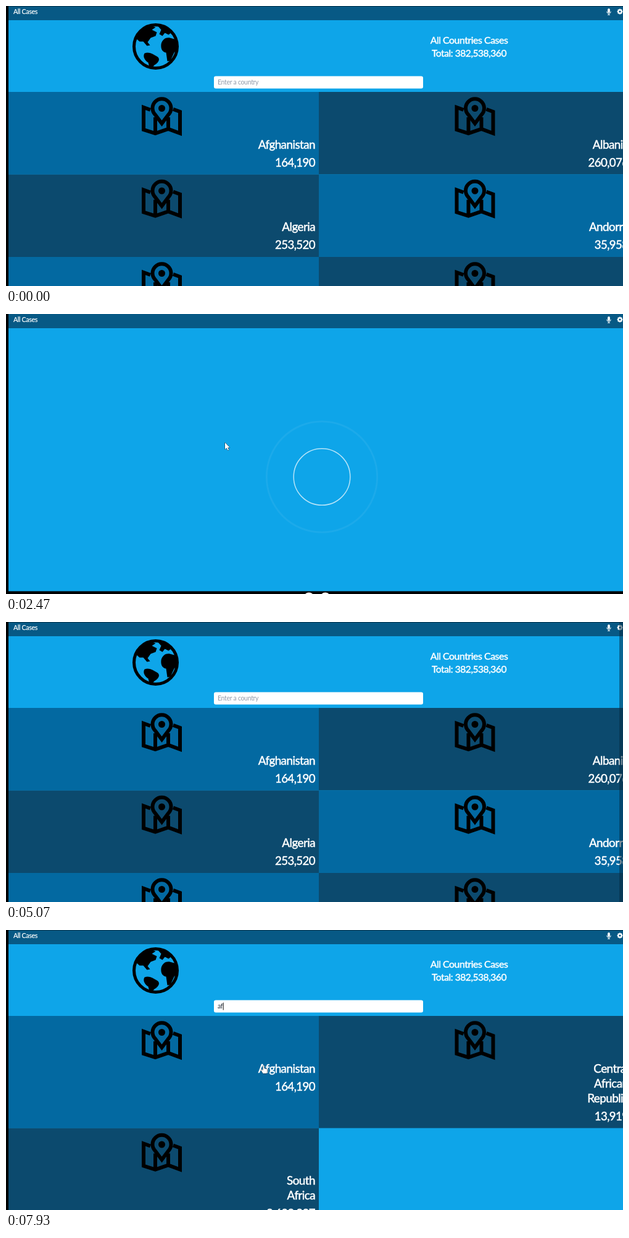
Write an HTML page with a canvas that moves like this. It is 1000 px wide and 453 px high and loops after 8000 ms.

```html
<!DOCTYPE html>
<html lang="en">
<head>
<meta charset="utf-8">
<title>All Cases</title>
<style>
html, body { margin: 0; width: 100%; height: 100%; overflow: hidden; background: #000; }
canvas { display: block; width: 100vw; height: 100vh; }
</style>
</head>
<body>
<canvas id="stage" width="1000" height="453"></canvas>
<script>
const ctx = document.getElementById('stage').getContext('2d');
const LOOP = 8000, STEP = 130;
const SKY = '#0ea5e9', MID = '#0369a1', DEEP = '#0c4a6e', HEAD = '#075985';

const COUNTRIES = [
  [['Afghanistan'], '164,190'], [['Albania'], '260,076'],
  [['Algeria'], '253,520'], [['Andorra'], '35,958'],
  [['Angola'], '98,057'], [['Antigua'], '7,140']
];
const MATCHES = [
  [['Afghanistan'], '164,190'],
  [['Central', 'African', 'Republic'], '13,919'],
  [['South', 'Africa'], '3,609,207']
];

const MAP = new Path2D('M14 21 L3 17 V53 L22 59 L43 52 L62 59 V24 L51 20 M22 33 V59 M43 33 V52');
const PIN = new Path2D('M32.5 43 L21.5 28.5 A15 15 0 1 1 43.5 28.5 Z');
const LAND = [
  'M-33 -14 Q-26 -33 -8 -34 L0 -31 L-6 -27 L2 -23 L0 -17 L-8 -14 L-13 -7 L-9 -2 L-14 -1 L-20 -8 L-26 -8 Z',
  'M-18 11 C-10 8 -4 13 2 16 C9 20 4 27 -2 30 L-7 36 L-10 34 L-12 26 C-18 22 -21 16 -18 11 Z',
  'M9 -4 C11 -12 17 -15 23 -14 L34 -11 L35 4 L30 10 L24 23 L19 24 L17 10 C11 9 8 4 9 -4 Z',
  'M2 -35 L15 -32 L26 -23 L21 -19 L15 -22 L11 -17 L6 -20 L9 -27 Z'
].map(d => new Path2D(d));
const ARROW = new Path2D('M0 0 V11 L2.6 8.6 L4.4 12.4 L6 11.6 L4.3 8 H7.6 Z');
const HAND = new Path2D('M-1 1 Q0 -1 1 1 V5 L5 6 Q6 6 6 8 L5 13 H-1 L-4 8 L-3 7 L-1 8 Z');

function rect(x, y, w, h, color) {
  ctx.fillStyle = color;
  ctx.fillRect(x, y, w, h);
}

function disc(x, y, r, color) {
  ctx.beginPath();
  ctx.arc(x, y, r, 0, Math.PI * 2);
  ctx.fillStyle = color;
  ctx.fill();
}

function at(x, y, draw) {
  ctx.save();
  ctx.translate(x, y);
  draw();
  ctx.restore();
}

// Draws one line of text and returns its width.
function text(str, x, y, size, { align = 'left', color = '#fff', bold = 0 } = {}) {
  ctx.font = `${size}px Lato, "Open Sans", sans-serif`;
  ctx.letterSpacing = `${-0.03 * size}px`;
  ctx.textAlign = align;
  ctx.fillStyle = ctx.strokeStyle = color;
  ctx.fillText(str, x, y);
  if (bold) {
    ctx.lineWidth = bold;
    ctx.lineJoin = 'round';
    ctx.strokeText(str, x, y);
  }
  return ctx.measureText(str).width;
}

function globe(x, y) {
  at(x, y, () => {
    ctx.beginPath();
    ctx.arc(0, 0, 35, 0, Math.PI * 2);
    ctx.lineWidth = 5;
    ctx.strokeStyle = ctx.fillStyle = '#000';
    ctx.stroke();
    ctx.clip();
    LAND.forEach(shape => ctx.fill(shape));
  });
}

function mapIcon(x, y) {
  at(x, y, () => {
    ctx.strokeStyle = '#000';
    ctx.lineWidth = 6;
    ctx.lineJoin = 'miter';
    ctx.stroke(MAP);
    ctx.stroke(PIN);
    disc(32.5, 18.5, 5.5, '#000');
  });
}

function mic(x) {
  at(x, 9, () => {
    ctx.beginPath();
    ctx.roundRect(-1.9, -5, 3.8, 7, 1.9);
    ctx.fillStyle = ctx.strokeStyle = '#fff';
    ctx.fill();
    ctx.lineWidth = 1;
    ctx.beginPath();
    ctx.arc(0, -0.2, 3.3, 0, Math.PI);
    ctx.moveTo(0, 3.2);
    ctx.lineTo(0, 5.2);
    ctx.moveTo(-2, 5.2);
    ctx.lineTo(2, 5.2);
    ctx.stroke();
  });
}

function gear(x, y) {
  at(x, y, () => {
    for (let i = 0; i < 4; i++) {
      rect(-1.1, -4.4, 2.2, 8.8, '#fff');
      ctx.rotate(Math.PI / 4);
    }
    disc(0, 0, 3.5, '#fff');
    disc(0, 0, 1.6, HEAD);
  });
}

function header() {
  rect(0, 0, 1000, 23, HEAD);
}

function homeHeader() {
  header();
  text('All Cases', 12, 13, 10.6, { bold: 0.2 });
  mic(977);
  gear(995, 9);
}

function tile([lines, count], x, y, h, color) {
  rect(x, y, 507.5, h, color);
  mapIcon(x + 220.5, y + 8);
  const style = { align: 'right', bold: 0.5 };
  let base = y + 91.5;
  lines.forEach((line, i) => text(line, x + 501.5, base + i * 24, 18.9, style));
  base += (lines.length - 1) * 24 + 29;
  text(count, x + 501.5, base, 18.6, style);
}

function tiles(list, h) {
  list.forEach((item, i) => {
    const row = i >> 1, col = i & 1;
    const x = col ? 507 : -0.5;
    tile(item, x, 139 + row * h, h, (row + col) % 2 ? DEEP : MID);
  });
}

function input(typed, caret) {
  ctx.beginPath();
  ctx.roundRect(337, 113.5, 339, 20, 3);
  ctx.fillStyle = '#fff';
  ctx.fill();
  if (!typed) text('Enter a country', 343, 127, 10.5, { color: '#929baa' });
  const w = typed ? text(typed, 343, 127, 10.5, { color: '#26313f' }) : 0;
  if (caret) rect(343.5 + w, 117.5, 1, 12, '#111');
}

function home(typed, caret) {
  rect(0, 0, 1000, 453, SKY);
  homeHeader();
  rect(0, 0, 1000, 1, '#04334d');
  globe(242.5, 65.5);
  const style = { align: 'center', bold: 0.45 };
  text('All Countries Cases', 750.5, 60.5, 15.9, style);
  text('Total: 382,538,360', 750.5, 82, 15.6, style);
  input(typed, caret);
  if (typed === 'af') tiles(MATCHES, 181.5);
  else tiles(COUNTRIES, 133.5);
}

function bezier(x1, y1, x2, y2) {
  const curve = (s, a, b) => 3 * (1 - s) ** 2 * s * a + 3 * (1 - s) * s * s * b + s ** 3;
  return x => {
    let lo = 0, hi = 1;
    for (let i = 0; i < 24; i++) {
      const mid = (lo + hi) / 2;
      if (curve(mid, x1, x2) < x) lo = mid; else hi = mid;
    }
    return curve(lo, y1, y2);
  };
}
const grow = bezier(0.165, 0.84, 0.44, 1);
const fade = bezier(0.3, 0.61, 0.355, 1);

function loading(t) {
  rect(0, 0, 1000, 453, SKY);
  homeHeader();
  rect(0, 448.5, 1000, 5, '#000');
  disc(491, 459, 8.5, '#fff');
  disc(517.5, 459, 8.5, '#fff');
  const period = 2640;
  for (const shift of [0, 0.5]) {
    const p = ((t - 782) / period + shift) % 1;
    const scale = grow(p);
    ctx.beginPath();
    ctx.arc(512, 263.5, 93 * scale, 0, Math.PI * 2);
    ctx.lineWidth = 3 * scale;
    ctx.strokeStyle = `rgba(255,255,255,${1 - fade(p)})`;
    ctx.stroke();
  }
}

function country() {
  rect(0, 0, 1000, 453, SKY);
  header();
  rect(0, 0, 1000, 1, '#04334d');
  ctx.beginPath();
  ctx.moveTo(21.5, 6);
  ctx.lineTo(18, 9.5);
  ctx.lineTo(21.5, 13);
  ctx.lineWidth = 1.6;
  ctx.strokeStyle = '#fff';
  ctx.stroke();
  text('2022', 33, 13, 10.2, { bold: 0.2 });
  text('All Cases', 518.5, 13, 10.6, { align: 'center', bold: 0.2 });
  mic(988);
  globe(249, 81.5);
  const style = { align: 'right', bold: 0.5 };
  text('Afghanistan', 818.5, 76.5, 18.9, style);
  text('164,190 cases', 818.5, 100.5, 18.8, style);
  rect(0, 140, 1000, 23.5, MID);
  text('Country Breakdown - 2022', 12, 156, 11.7, { bold: 0.2 });
}

// Pointer keys: time, x, y.
const VISITS = [
  [[260, 395, 330], [650, 348, 240], [1170, 348, 240], [2470, 355, 208],
   [3770, 350, 224], [4420, 14.5, 9.5], [4810, 14.5, 9.5]],
  [[7670, 410, 150], [7930, 417.5, 219], [8000, 417.5, 219]]
];

function pointer(t) {
  for (const keys of VISITS) {
    const i = keys.findIndex(k => k[0] > t);
    if (i < 1) continue;
    const [t0, x0, y0] = keys[i - 1], [t1, x1, y1] = keys[i];
    const p = (t - t0) / (t1 - t0), e = p * p * (3 - 2 * p);
    const arrow = t >= 1170 && t < 4420;
    at(x0 + (x1 - x0) * e, y0 + (y1 - y0) * e, () => {
      const shape = arrow ? ARROW : HAND;
      ctx.lineWidth = 1;
      ctx.strokeStyle = '#123';
      ctx.stroke(shape);
      ctx.fillStyle = '#fff';
      ctx.fill(shape);
    });
  }
}

function draw(t) {
  ctx.clearRect(0, 0, 1000, 453);
  if (t >= 1170 && t < 3510) loading(t);
  else if (t >= 3510 && t < 4810) country();
  else {
    const typed = t >= 7540 ? 'af' : t >= 7150 ? 'a' : '';
    const caret = t >= 7150 || (t >= 6110 && t < 6630);
    home(typed, caret);
    if (t >= 4810 && t < 5330) rect(994, 0, 6, 453, 'rgba(4,40,62,.5)');
  }
  pointer(t);
  rect(0, 0, 4, 453, '#000');
}

function frame(now) {
  const t = now % LOOP;
  draw(Math.floor(t / STEP) * STEP);
  requestAnimationFrame(frame);
}
requestAnimationFrame(frame);
</script>
</body>
</html>
```
